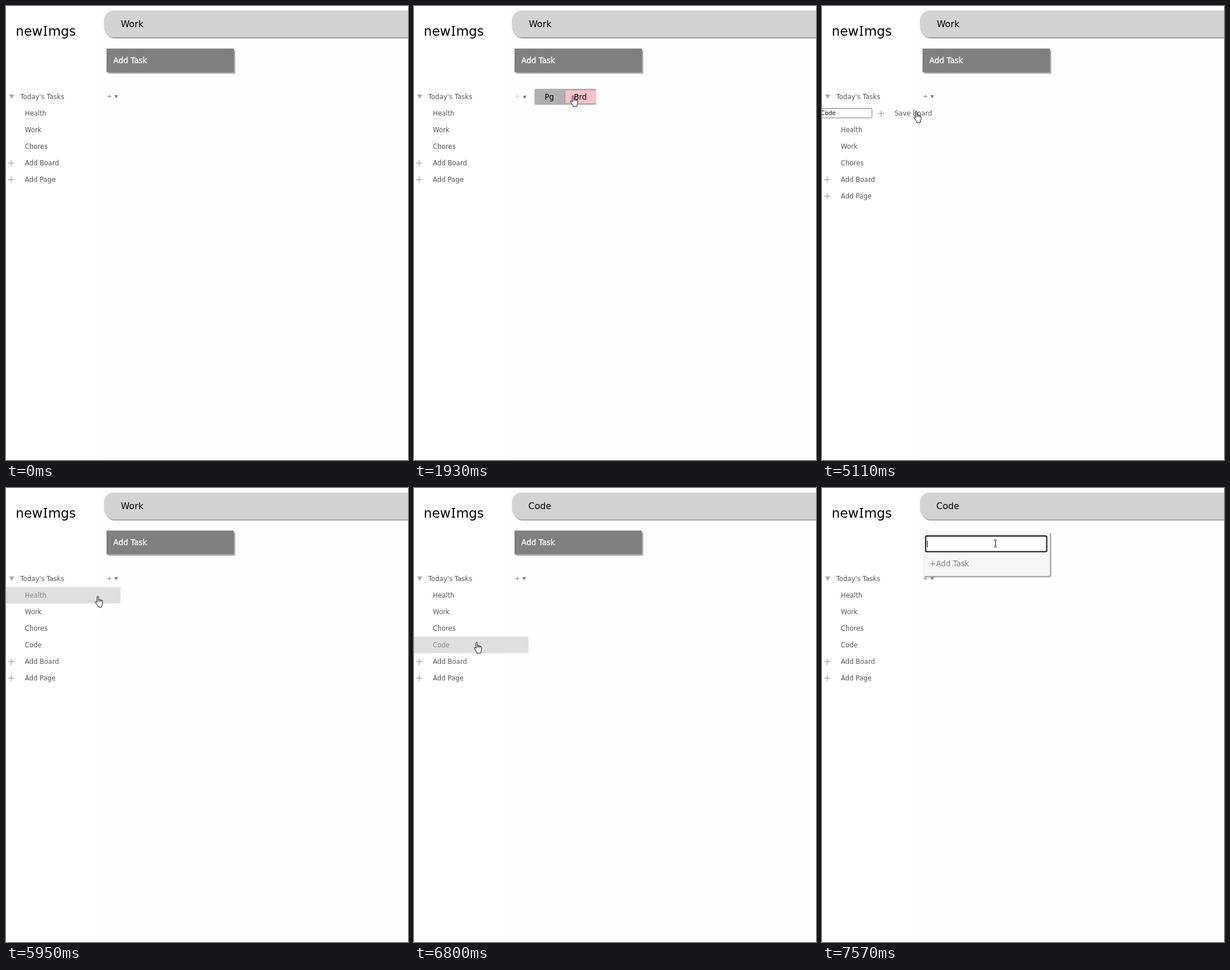
These frames come from a looping animation (704 by 795 pixels, 8000 ms). An HTML page:

```html
<!DOCTYPE html>
<html lang="en">
<head>
<meta charset="utf-8">
<title>Task board</title>
<style>
  html, body { margin: 0; width: 100%; height: 100%; overflow: hidden; background: #fff; }
  svg { display: block; width: 704px; height: 795px; font-family: Verdana, "DejaVu Sans", sans-serif; }
  text { white-space: pre; }
</style>
</head>
<body>
<svg viewBox="0 0 704 795" xmlns="http://www.w3.org/2000/svg">
  <rect width="704" height="795" fill="#fefefe"/>
  <rect width="166" height="795" fill="#fff"/>
  <text x="17" y="52" font-size="22.8">new<tspan dx=".9" font-family="Noto Sans, sans-serif" font-size="23.2">I</tspan><tspan dx=".9">mgs</tspan></text>
  <rect x="173.5" y="10.5" width="560" height="46.5" rx="17" fill="#a9a9a9"/>
  <rect x="171.5" y="8" width="560" height="46.5" rx="17" fill="#d3d3d3"/>
  <g id="scene"></g>
</svg>
<script>
const LOOP = 8000;
const ROW_TOP = 144.5, ROW_H = 29, ROW_W = 200.5;
const T = { toggle: 1070, menu: 1240, menuEnd: 1540, edit: 2090, save: 5180, added: 5580, open: 6570, panel: 7540 };

// Pointer hotspot: time, x, y
const PATH = [
  [210, 605, 742], [450, 470, 480], [750, 270, 215], [900, 203, 162], [990, 187, 158],
  [1740, 187, 158], [1930, 278.5, 157], [2100, 278.5, 157], [2350, 330, 270], [2550, 358.5, 314.5],
  [4380, 358.5, 314.5], [4490, 386, 296], [4680, 270, 215], [4870, 165.5, 185],
  [5930, 165.5, 185], [6250, 95, 253], [6330, 95, 253], [6500, 100, 276], [6780, 100, 276],
  [7000, 205, 215], [7180, 296, 147], [7260, 296, 147], [7460, 303.5, 97]
];

const scene = document.getElementById("scene");
const ramp = (t, a, b) => Math.min(1, Math.max(0, (t - a) / (b - a)));

function pointer(t) {
  if (t < PATH[0][0]) return null;
  const i = PATH.findIndex(k => k[0] > t);
  if (i < 0) return PATH[PATH.length - 1].slice(1);
  const [t0, x0, y0] = PATH[i - 1], [t1, x1, y1] = PATH[i];
  const p = ramp(t, t0, t1);
  return [x0 + (x1 - x0) * p, y0 + (y1 - y0) * p];
}

const rect = (x, y, w, h, fill, more = "") =>
  `<rect x="${x}" y="${y}" width="${w}" height="${h}" fill="${fill}" ${more}/>`;
const text = (x, y, size, fill, str, more = "") =>
  `<text x="${x}" y="${y}" font-size="${size}" fill="${fill}" ${more}>${str}</text>`;
const path = (d, more) => `<path d="${d}" ${more}/>`;
const plus = (x, y, r, color, w = 1.3) =>
  path(`M${x - r} ${y}h${2 * r}M${x} ${y - r}v${2 * r}`, `stroke="${color}" stroke-width="${w}"`);

function rowList(t) {
  const rows = ["Today's Tasks", "Health", "Work", "Chores", "Add Board", "Add Page"];
  if (t >= T.edit && t < T.save) rows.splice(1, 0, "");
  if (t >= T.added) rows.splice(4, 0, "Code");
  return rows;
}

function input(t) {
  const typed = "Code".slice(0, [3800, 3950, 4040, 4130].filter(k => t >= k).length);
  const caret = [0, 5.5, 11.5, 18, 24][typed.length];
  const showCaret = typed && t < 4410;
  return rect(-40, 179.5, 127.5, 16.5, "#fff", 'rx="2" stroke="#767676"') +
    text(-2, 191.3, 10.1, "#000", typed) +
    (showCaret ? rect(caret - .5, 181.5, 1, 12.5, "#000") : "") +
    plus(103.5, 188, 5.5, "#a9a9a9") + text(127, 192.2, 11.5, "#555", "Save Board");
}

function sidebar(t, pos) {
  const rows = rowList(t);
  const hover = pos && pos[0] < ROW_W ? Math.floor((pos[1] - ROW_TOP) / ROW_H) : -1;
  const fade = t >= T.save && t < 5330 ? ramp(t, T.save - 40, 5330) : 1;
  return rows.map((label, i) => {
    if (!label) return input(t);
    const top = ROW_TOP + i * ROW_H, mid = top + 14.5, on = i === hover;
    let out = on ? rect(0, top - .5 + .2, ROW_W, ROW_H, "#dfdfdf", `opacity="${fade}"`) : "";
    if (i === 0) out += path("M5.5 155h9l-4.5 8z", 'fill="#a9a9a9"');
    if (label.startsWith("Add")) out += plus(9, mid, 5.5, "#a9a9a9");
    return out + text(i ? 33 : 25, mid + 4.2, 11.5, on ? "#888" : "#555", label);
  }).join("");
}

function menu(t) {
  const open = t >= T.toggle && t < T.edit;
  const k = open ? ramp(t, T.menu, T.menuEnd) : 0;
  let out = plus(181, 158.5, 3.3, `rgb(${[0, 0, 0].map(() => 125 + 80 * k)})`, 1) +
    path(open ? "M195.5 156v6l-5-3z" : "M190 156.3h6l-3 5z", 'fill="#666"');
  if (!k) return out;
  const hover = t >= 1890;
  return out + `<g opacity="${k}">` +
    rect(211, 145, 108, 28, "#b0b0b0", 'rx="2"') +
    (hover ? rect(265, 148, 54, 22, "#ffc0cb") : "") +
    rect(264, 148, 1, 22, "#8f8f9c") +
    text(237, 164, 13.2, "#000", "Pg", 'text-anchor="middle"') +
    text(291.3, 164, 13.2, "#000", "Brd", 'text-anchor="middle"') + "</g>";
}

function taskBox(t) {
  if (t < T.panel)
    return rect(178.5, 77.5, 223, 41, "#a9a9a9") + rect(176, 74.5, 223, 41.5, "#808080") +
      text(188, 100.3, 13.4, "#fff", "Add Task", 'stroke="#fff" stroke-width=".3"');
  return rect(178.5, 78.5, 223, 78, "#a9a9a9", 'rx="3"') + rect(176, 75.5, 223, 78.5, "#f5f5f5", 'rx="3"') +
    rect(181.5, 84, 212, 27.5, "#fff", 'rx="2" stroke="#101010" stroke-width="2"') +
    rect(184, 92, 1, 12, "#000") + text(188.5, 136.6, 13.2, "#808080", "+Add Task");
}

const HAND = "M4 1.8C4 .2 6.6 .2 6.6 1.8V7C7 5.8 9 6 9 7.3C9.5 6.4 11.3 6.7 11.3 8C12 7.2 13.4 7.8 13.4 9V13" +
  "C13.4 15.5 12 16.5 12 19.5H5.6C5.6 17 3.5 15.5 1 11.5C0 10 1.8 8.8 3 10.2L4 11.4Z" +
  "M6.6 7v3M9 7.3v2.7M11.3 8v2";
const ARROW = "M0 0V13.2L3 10.4L5 15L7.2 14L5.2 9.6H9.2Z";
const BEAM = "M-2.5-6H-.5L0-5.5L.5-6H2.5M0-5.5V5.5M-2.5 6H-.5L0 5.5L.5 6H2.5";

function cursor(t, pos) {
  if (!pos) return "";
  const [x, y] = pos;
  const inside = (l, top, r, b) => x > l && x < r && y > top && y < b;
  if (t >= T.panel) return path(BEAM, `transform="translate(${x} ${y})" fill="none" stroke="#000"`);
  const hand = inside(0, ROW_TOP, ROW_W, 348) || inside(176, 74, 399, 116) ||
    (t > T.menu && t < T.edit && inside(211, 145, 319, 173));
  const at = hand ? [x - 5.3, y - .5] : pos;
  return path(hand ? HAND : ARROW,
    `transform="translate(${at})" fill="#fff" stroke="#000" stroke-width="1" stroke-linejoin="round"`);
}

function draw(t) {
  const pos = pointer(t);
  const title = t < T.open ? text(201, 37.2, 15.7, "#000", "Work") : text(200.3, 37.2, 15.7, "#000", "Code");
  scene.innerHTML = title + sidebar(t, pos) + menu(t) + taskBox(t) + cursor(t, pos);
}

const start = performance.now();
function tick() {
  draw((performance.now() - start) % LOOP);
  requestAnimationFrame(tick);
}
tick();
</script>
</body>
</html>
```
